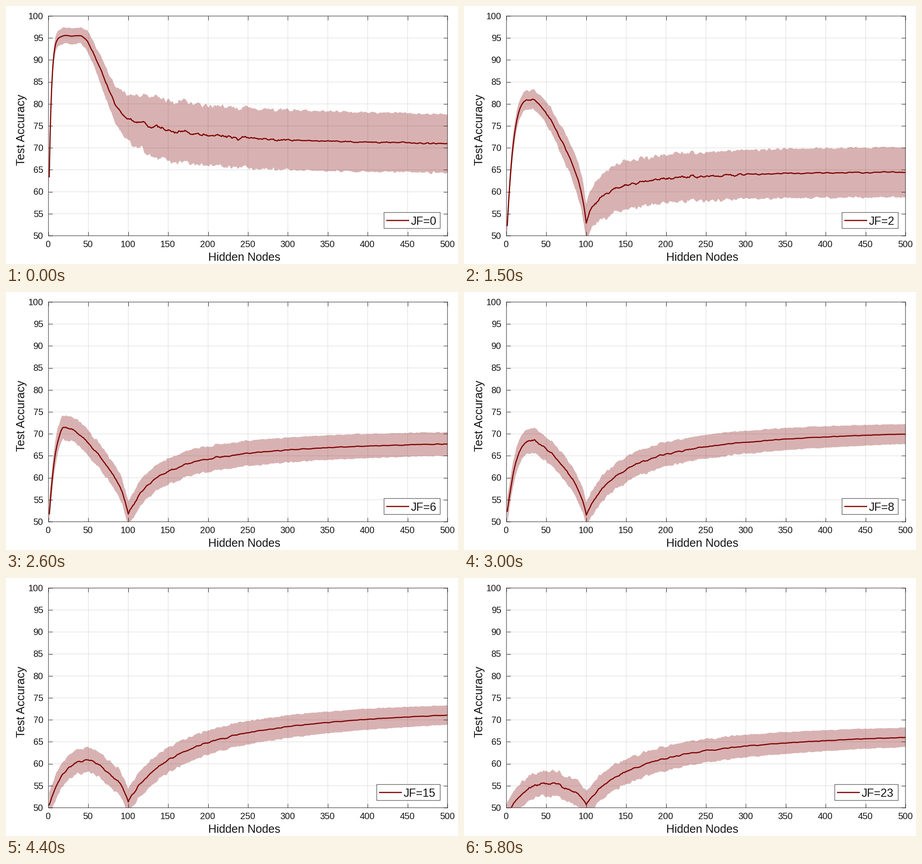
Write a matplotlib script that moves like this. It is 990 px wide and 566 px high and loops after 6800 ms.

```python
import matplotlib.pyplot as plt
import numpy as np
from matplotlib.animation import FuncAnimation
from matplotlib.patches import Rectangle

W, H, DPI = 990, 566, 100
LEFT, RIGHT, TOP, BOTTOM = 93, 967, 22, 504
MAROON, INK, TEXT = "#800000", "#262626", "#141414"
STEP = 100
LOOP = 6800
CHANGES = [1000, 1500, 1900, *range(2200, 5801, 200)]
LEVELS = [*range(22), 23]
DIP_AT = 100

PT = 72 / DPI  # points per pixel
plt.rcParams["font.family"] = "Liberation Sans"
nodes = np.arange(1, 501)

# Key points of the curve against the JF level, blended linearly between
START = {0: 63.4, 1: 53, 4: 51, 11: 53.8, 18: 48.5}
PEAK = {0: 95.5, 1: 83, 4: 76.9, 6: 71.5, 11: 64.2, 18: 58.2, 23: 55.6}
PEAK_AT = {0: 38, 1: 40, 4: 20, 6: 23, 11: 48, 23: 58}
DIP = {0: 76.8, 1: 53.9, 4: 51.8, 23: 50.9}
END = {0: 71, 1: 64.7, 4: 64.1, 6: 67.7, 10: 72.2, 11: 71.8, 17: 70.7, 18: 69.2, 23: 66}


def at(points, level):
    return np.interp(level, list(points), list(points.values()))


def bell(level, width):
    return np.exp(-(level / width) ** 2)


def mean_curve(level):
    """Steep rise to a peak, fall to the dip, then a saturating recovery."""
    start, peak, peak_at, dip, end = (
        at(points, level) for points in (START, PEAK, PEAK_AT, DIP, END))

    v = np.clip((nodes - 1) / (peak_at - 1), 0, 1)
    rise = 1 - (1 - v) ** (2.7 + 9 * bell(level, 2) ** 2)

    u = np.clip((nodes - peak_at) / (DIP_AT - peak_at), 0, 1)
    w = np.clip((nodes - DIP_AT) / (nodes[-1] - DIP_AT), 0, 1)
    if level == 0:  # no cusp: the curve slides straight into its tail
        fall, lag = u * u * (3 - 2 * u), 0.2
    else:
        fall, lag = 0.8 * u ** 1.4 + 0.2 * u ** 12, min(0.03 + 0.012 * level, 0.18)
    recovery = w * (1 + lag) / (w + lag)

    return (start + (peak - start) * rise + (dip - peak) * fall
            + (end - dip) * recovery)


def half_width(level):
    early = min(1.8 + 0.2 * level, 2.8)
    middle = 2.9 + 4 * bell(level, 3)
    late = 2.2 + 4.5 * bell(level, 4)
    return np.interp(nodes, [40, 130, 500], [early, middle, late])


def wobble(rng, width):
    return np.convolve(rng.normal(size=nodes.size), np.ones(width) / width, "same")


def curve(level):
    """Mean, lower edge and upper edge for one JF level."""
    rng = np.random.default_rng(level)
    half = half_width(level)
    rough = half * np.interp(nodes, [100, 350], [1, 0.3])
    mean = mean_curve(level) + 0.09 * rough * wobble(rng, 5)
    low = mean - half - 0.09 * rough * wobble(rng, 3)
    high = mean + half + 0.09 * rough * wobble(rng, 3)
    return mean, low, high


curves = {level: curve(level) for level in LEVELS}

fig = plt.figure(figsize=(W / DPI, H / DPI), dpi=DPI, facecolor="white")
ax = fig.add_axes([LEFT / W, 1 - BOTTOM / H, (RIGHT - LEFT) / W, (BOTTOM - TOP) / H])
ax.set(xlim=(0, 500), ylim=(50, 100),
       xticks=range(0, 501, 50), yticks=range(50, 101, 5))
ax.set_axisbelow(True)
ax.grid(color=INK, alpha=0.16, lw=PT)
ax.tick_params(direction="in", length=9 * PT, width=PT, color=INK, top=True,
               right=True, labelbottom=False, labelleft=False)
for spine in ax.spines.values():
    spine.set(color=INK, linewidth=PT, snap=False)
for grid_line in ax.get_xgridlines() + ax.get_ygridlines():
    grid_line.set_snap(False)

# Overlay in stage pixels for labels and legend
page = fig.add_axes([0, 0, 1, 1], facecolor="none")
page.set(xlim=(0, W), ylim=(H, 0))
page.axis("off")


def label(x, y, text, size, ha="center", **kw):
    return page.text(x, y, text, fontsize=size * PT, ha=ha, va="baseline",
                     color=TEXT, **kw)


for n in range(0, 501, 50):
    label(LEFT + n / 500 * (RIGHT - LEFT) - 0.8, 529, str(n), 19.6)
for v in range(50, 101, 5):
    label(81.5, BOTTOM - (v - 50) / 50 * (BOTTOM - TOP) + 6.8, str(v), 19.6, "right")
label(522, 559, "Hidden Nodes", 25)
label(40.5, 272, "Test Accuracy", 25.2, rotation=90, rotation_mode="anchor")

band, = ax.fill([0, 0], [0, 0], color=MAROON, alpha=0.3, lw=0, zorder=2)
line, = ax.plot([], [], color=MAROON, lw=2.5 * PT, solid_joinstyle="round", zorder=3)

box = page.add_patch(Rectangle((0, 453), 1, 35, fc="white", ec=INK, lw=PT, snap=False))
sample, = page.plot([], [], color=MAROON, lw=2.5 * PT, solid_capstyle="butt", snap=False)
caption = label(0, 479.5, "", 25, "left")


def draw(frame):
    level = LEVELS[np.searchsorted(CHANGES, frame * STEP, side="right")]
    mean, low, high = curves[level]
    line.set_data(nodes, mean)
    band.set_xy(np.column_stack([np.r_[nodes, nodes[::-1]], np.r_[low, high[::-1]]]))

    x = 828 if level < 10 else 812
    box.set_x(x)
    box.set_width(951 - x)
    sample.set_data([x + 5, x + 55], [470.5, 470.5])
    caption.set_x(x + 58.5)
    caption.set_text(f"JF={level}")
    return band, line, box, sample, caption


anim = FuncAnimation(fig, draw, frames=LOOP // STEP, interval=STEP,
                     repeat=True, repeat_delay=0, blit=False)
plt.show()
```
